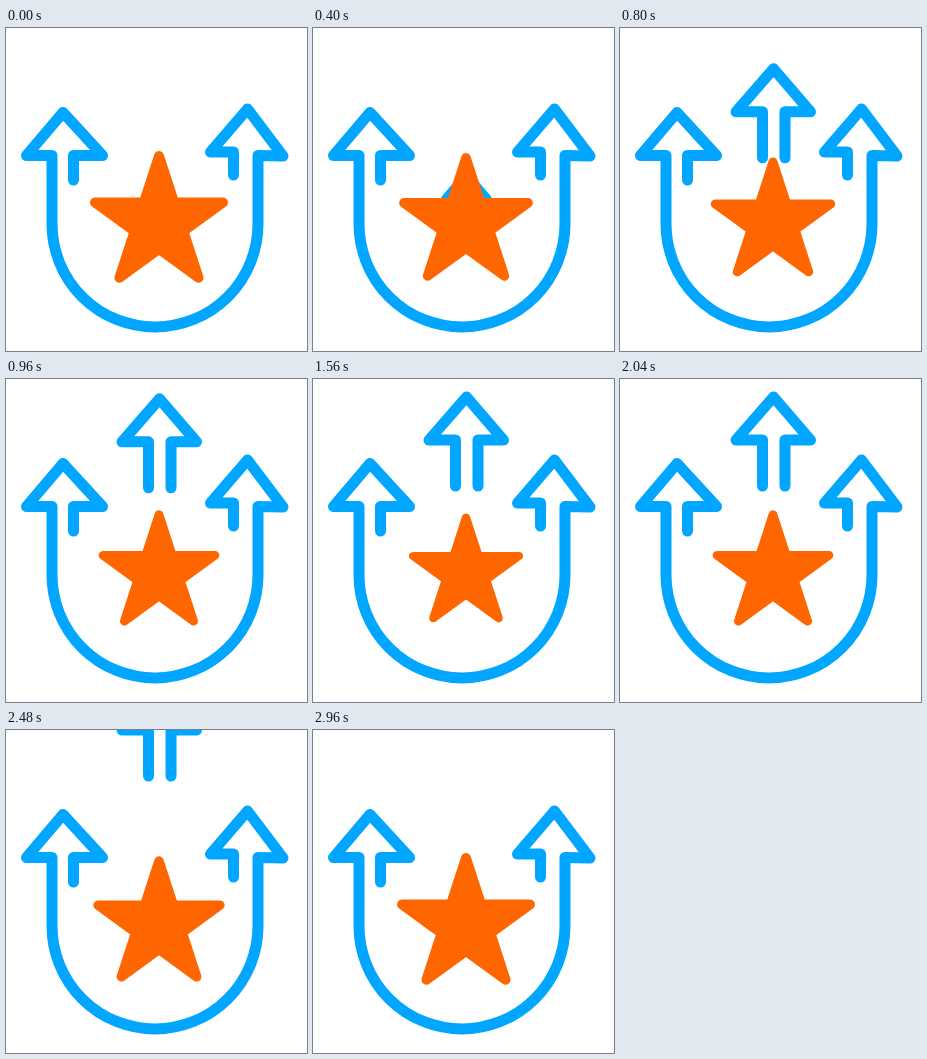
An HTML page that plays this animation: 301 px wide and 323 px high, repeating every 3040 ms.

```html
<!DOCTYPE html>
<html lang="en">
<head>
<meta charset="utf-8">
<title>Star and arrows</title>
<style>
  html, body { margin: 0; width: 100%; height: 100%; overflow: hidden; background: #fff; }
  svg { display: block; width: 301px; height: 323px; }
  path { stroke-linecap: round; stroke-linejoin: round; }
  .line { fill: none; stroke: #00a6ff; stroke-width: 11; }
  #star { fill: #f60; stroke: #f60; stroke-width: 10; }
</style>
</head>
<body>
<svg viewBox="0 0 301 323">
  <path class="line" d="M67.5 152V127.5H96.5L57 84.5L20.5 127.5H46V196A103 103 0 0 0 252 196V127.5L277 128L241.5 81L204.5 124H227.5V147"/>
  <path class="line" id="arrow" d="M142.5 107V61H116L153.5 18L190.5 61H165V107"/>
  <path id="star"/>
</svg>
<script>
const LOOP = 3040, STEP = 40;
const star = document.getElementById('star');
const arrow = document.getElementById('arrow');

// Five-pointed star around its scaling centre
const points = Array.from({ length: 10 }, (_, i) => {
  const r = i % 2 ? 25.7 : 67.3, a = i * Math.PI / 5;
  return [r * Math.sin(a), 6.3 - r * Math.cos(a)].map(v => v.toFixed(2)).join(' ');
});
star.setAttribute('d', 'M' + points.join('L') + 'Z');

const progress = (t, from, to) => Math.min(1, Math.max(0, (t - from) / (to - from)));
const ease = u => (1 - Math.cos(Math.PI * u)) / 2;

function draw(time) {
  const t = Math.floor((time % LOOP) / STEP) * STEP;
  const size = 0.913 + 0.087 * Math.cos(2 * Math.PI * (t + 20) / LOOP);
  star.setAttribute('transform', `translate(153 189) scale(${size})`);

  // The arrow grows behind the star, rises, rests, then leaves at the top
  const rise = ease(progress(t, 260, 1020));
  const leave = ease(progress(t, 2100, 2860));
  const grow = progress(t, 260, 500);
  const y = 118 * (1 - rise) - 122 * leave;
  arrow.setAttribute('transform',
    `translate(153.5 ${62 + y}) scale(${grow}) translate(-153.5 -62)`);
  arrow.style.display = grow > 0 && leave < 1 ? '' : 'none';
}

const start = performance.now();
function tick() {
  draw(performance.now() - start);
  requestAnimationFrame(tick);
}
draw(0);
requestAnimationFrame(tick);
</script>
</body>
</html>
```
